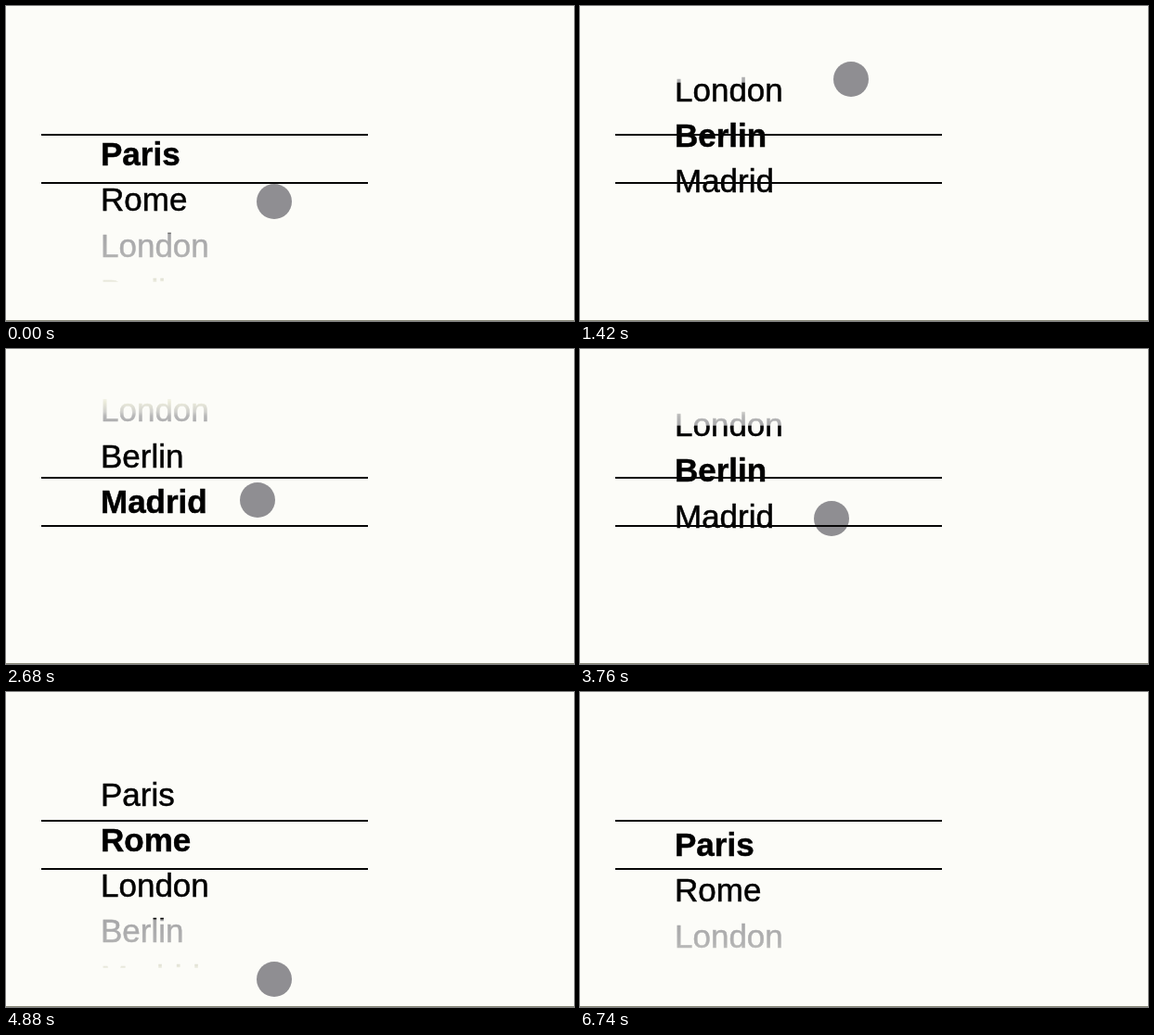
Write an HTML page with a canvas that moves like this. It is 612 by 340 pixels and loops after 6.76 s.

```html
<!DOCTYPE html>
<html lang="en">
<head>
<meta charset="utf-8">
<title>City picker</title>
<style>
  html, body { margin: 0; width: 100%; height: 100%; overflow: hidden; background: #fcfcf8; }
  canvas { display: block; width: 612px; height: 340px; }
</style>
</head>
<body>
<canvas id="stage" width="612" height="340"></canvas>
<script>
const ctx = document.getElementById('stage').getContext('2d');
const LOOP = 6760;
const PAPER = '#fcfcf8';
const CITIES = ['Paris', 'Rome', 'London', 'Berlin', 'Madrid'];
const ROW = 49.3;            // distance between baselines
const HOME = 177;            // baseline of the chosen row at rest
const END = HOME - 4 * ROW;  // first baseline when the last row is chosen
const DECAY = 6.2;           // fling time constant, in ticks
const FLING_UP = 26, GRAB = 58, FLING_DOWN = 104;

// Pointer path: tick, x, y
const PATH = [
  [0, 289, 211], [16, 289, 108], [26, 293, 73], [28, 298, 70], [31, 292, 79],
  [44, 272, 152], [50, 271, 163], [72, 271, 163], [80, 271, 183],
  [92, 278, 238], [103, 288.5, 301], [104, 289, 310], [118, 298, 309],
  [123, 324, 331], [128, 334, 362], [146, 334, 362]
];

// Smooth monotone interpolation of one column of the path
function along(tick, col) {
  const last = PATH.length - 2;
  let k = 0;
  while (k < last && tick >= PATH[k + 1][0]) k++;
  const slope = n => (PATH[n + 1][col] - PATH[n][col]) / (PATH[n + 1][0] - PATH[n][0]);
  const tangent = n => {
    if (n === 0) return slope(0);
    if (n > last) return slope(last);
    const a = slope(n - 1), b = slope(n);
    return a * b <= 0 ? 0 : 2 * a * b / (a + b);
  };
  const p = PATH[k], q = PATH[k + 1], span = q[0] - p[0];
  const u = (tick - p[0]) / span, v = 1 - u;
  return p[col] * (1 + 2 * u) * v * v + tangent(k) * span * u * v * v
       + q[col] * u * u * (3 - 2 * u) - tangent(k + 1) * span * u * u * v;
}

const dragUp = tick => along(tick, 2) - 39;
const dragDown = tick => Math.max(END, along(tick, 2) - 187.5);

function coast(from, to, ticks) {
  return to + (from - to) * Math.exp(-ticks / DECAY);
}

// Baseline of the first row
function scrollAt(tick) {
  if (tick <= FLING_UP) return dragUp(tick);
  if (tick < GRAB) return coast(dragUp(FLING_UP), END, tick - FLING_UP);
  if (tick <= FLING_DOWN) return dragDown(tick);
  return coast(dragDown(FLING_DOWN), HOME, tick - FLING_DOWN);
}

// Three uneven ticks in every 140 ms
function tickAt(ms) {
  const part = ms % 140;
  return 3 * Math.floor(ms / 140) + (part < 20 ? 0 : part < 120 ? 1 : 2);
}

const ink = ctx.createLinearGradient(0, 50, 0, 300);
[
  [50, PAPER], [57, '#ececdc'], [68, '#d0d0cc'], [72, '#b8b8b8'],
  [82, '#a8a8aa'], [83.5, '#000'], [244.5, '#000'], [246, '#a6a6a8'],
  [272, '#b2b2b2'], [286, '#d2d2cc'], [296, '#e6e6d8'], [300, PAPER]
].forEach(([y, color]) => ink.addColorStop((y - 50) / 250, color));

function drawRows(first) {
  const chosen = Math.max(0, Math.min(4, Math.floor((HOME + 3 - first) / ROW)));
  ctx.save();
  ctx.beginPath();
  ctx.rect(38, 54, 352, 244);
  ctx.clip();
  ctx.fillStyle = ctx.strokeStyle = ink;
  ctx.lineWidth = 0.5;
  CITIES.forEach((city, n) => {
    const y = first + n * ROW;
    ctx.font = (n === chosen ? 'bold ' : '') + '35px "Liberation Sans", Arial, sans-serif';
    ctx.fillText(city, 102, y);
    ctx.strokeText(city, 102, y);
  });
  ctx.restore();
}

function draw(ms) {
  const tick = tickAt(ms);
  ctx.fillStyle = PAPER;
  ctx.fillRect(0, 0, 612, 340);

  ctx.fillStyle = '#8f8e92';
  ctx.beginPath();
  ctx.arc(along(tick, 1), along(tick, 2), 19, 0, 2 * Math.PI);
  ctx.fill();

  drawRows(scrollAt(tick));

  ctx.fillStyle = '#060606';
  ctx.fillRect(38, 138, 352, 2);
  ctx.fillRect(38, 190, 352, 2);
  ctx.fillStyle = '#888878';
  ctx.fillRect(0, 339, 612, 1);
}

const start = performance.now();
function loop() {
  draw((performance.now() - start) % LOOP);
  requestAnimationFrame(loop);
}
loop();
</script>
</body>
</html>
```
